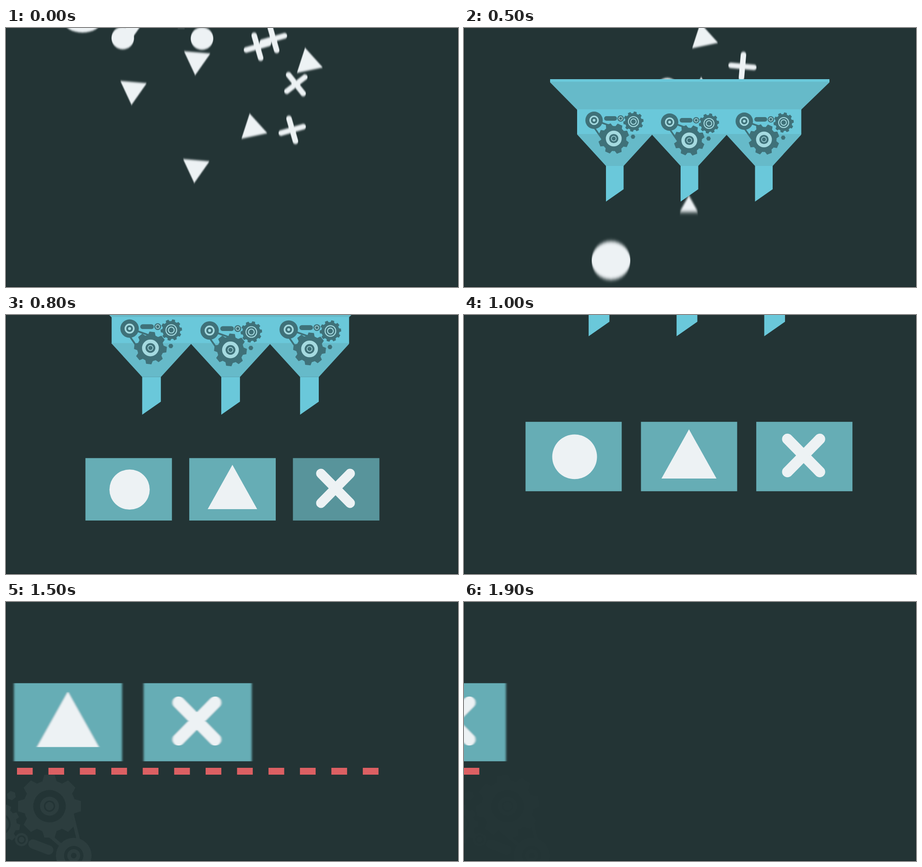
Recreate the animation shown at these times as an HTML page. Size 987 px wide and 567 px high, loop 2 s.

```html
<!DOCTYPE html>
<html lang="en">
<head>
<meta charset="utf-8">
<title>Shape sorter</title>
<style>
  html, body { margin: 0; width: 100%; height: 100%; overflow: hidden; background: #233435; }
  svg { display: block; width: 987px; height: 567px; }
</style>
</head>
<body>
<svg id="stage" viewBox="0 0 987 567" xmlns="http://www.w3.org/2000/svg"></svg>
<script>
const LOOP = 2000, STEP = 100;
const BG = '#233435', WHITE = '#edf2f4', BRIGHT = '#6ac8da', DULL = '#66bac9',
      GEAR = '#3f7179', PALE = '#a5dae0', BOX = '#66adb5', RED = '#dc6063';
const stage = document.getElementById('stage');

// Piecewise linear track of [time, value] pairs.
function track(keys, t) {
  if (t <= keys[0][0]) return keys[0][1];
  for (let i = 1; i < keys.length; i++) {
    const [t0, a] = keys[i - 1], [t1, b] = keys[i];
    if (t <= t1) return a + (b - a) * (t - t0) / (t1 - t0);
  }
  return keys[keys.length - 1][1];
}

const group = (transform, body, extra = '') => `<g transform="${transform}" ${extra}>${body}</g>`;
const circle = (x, y, r, fill) => `<circle cx="${x}" cy="${y}" r="${r}" fill="${fill}"/>`;
const ring = (x, y, r, w, color) =>
  `<circle cx="${x}" cy="${y}" r="${r}" fill="none" stroke="${color}" stroke-width="${w}"/>`;
const rect = (x, y, w, h, fill) => `<rect x="${x}" y="${y}" width="${w}" height="${h}" fill="${fill}"/>`;
const poly = (points, fill) => `<polygon points="${points}" fill="${fill}"/>`;
const stroke = (d, w, color, cap = 'round') =>
  `<path d="${d}" fill="none" stroke="${color}" stroke-width="${w}" stroke-linecap="${cap}"/>`;
const blur = (id, x, y) =>
  `<filter id="${id}" filterUnits="userSpaceOnUse" x="-100" y="-150" width="1300" height="900">
   <feGaussianBlur stdDeviation="${x} ${y}"/></filter>`;

const defs = '<defs>' + blur('fall', 0, 1.9) + blur('drop', 0, 4.2) + blur('slide', 1.7, 0) + '</defs>';

const shapes = {
  C: circle(0, 0, 24.7, WHITE),
  T: poly('0,-33.5 29,16.8 -29,16.8', WHITE),
  P: stroke('M-25 0H25M0-26V26', 12, WHITE),
  B: `<ellipse rx="41" ry="25" fill="${WHITE}"/>`,
  S: rect(-7, -1, 15, 1.5, '#8b9596')
};

// kind, time, x, y, turn, vy, vx
const pieces = [
  ['B', 0, 167, -15, 0, -.6], ['S', 0, 382, 0, 0, -.3],
  ['T', 200, 277, 125, 185],
  ['C', 0, 255, 22, 0, .7, .3],
  ['C', 0, 428, 23, 0, .685],
  ['T', 0, 416, 70, 185, .98, -.01],
  ['T', 0, 277, 135, 185, .635, .035],
  ['T', 0, 414, 306, 185],
  ['T', 0, 660, 76, -12, .655],
  ['T', 0, 539, 220, -12],
  ['P', 0, 549, 41, -16, .69],
  ['P', 0, 584, 24, -16, .605, -.265],
  ['P', 0, 633, 123, -38, .655],
  ['P', 0, 625, 223, -16],
  ['C', 200, 331, 38, 0],
  ['C', 200, 428, 15, 0],
  ['T', 200, 525, 41, -85],
  ['C', 200, 688, 34, 0],
  ['P', 200, 633, 114, -38, .8],
  ['T', 500, 523, 22, -12],
  ['P', 500, 608, 84, 5],
  ['C', 500, 444, 134, 0],
  ['T', 500, 518, 141, 0],
  ['C', 700, 547, 27, 0],
  ['C', 700, 565, -15, 0]
];

function rain(t, top) {
  let out = '';
  for (const [kind, t0, x, y, turn, vy = .67, vx = 0] of pieces) {
    const py = y + vy * (t - t0);
    if (py > -60 && py < top + 35)
      out += group(`translate(${x + vx * (t - t0)} ${py}) rotate(${turn})`, shapes[kind]);
  }
  return `<g filter="url(#fall)">${out}</g>`;
}

function cog(x, y, teeth, r, depth, turn, color) {
  let out = circle(x, y, r - depth, color);
  const w = r * Math.PI / teeth;
  for (let i = 0; i < teeth; i++)
    out += group(`translate(${x} ${y}) rotate(${turn + i * 360 / teeth})`,
      poly(`${-w * .6},${-r + depth + 2} ${-w * .42},${-r} ${w * .42},${-r} ${w * .6},${-r + depth + 2}`, color));
  return out;
}

function machine(t, dark, light) {
  const turn = 24 + (t - 1500) * .09;
  return stroke('M-36-38L-2-26M-44-26L-26 0', 3.6, dark, 'butt')
    + circle(-43, -40, 19, dark) + ring(-43, -40, 8.6, 3.4, light) + circle(-43, -40, 3, light)
    + stroke('M-16-44H2', 10, dark)
    + circle(15, -44, 7, dark) + ring(15, -44, 3.8, 1.6, light)
    + cog(43, -37, 10, 22, 3.5, -turn * 1.25, dark)
    + ring(43, -37, 11, 2, light) + ring(43, -37, 6, 2, light)
    + poly('47,-4 44.5,.4 39.5,.4 37,-4 39.5,-8.4 44.5,-8.4', dark)
    + cog(0, 0, 8, 33.5, 6, turn, dark)
    + ring(0, 0, 13.7, 7.2, light) + ring(0, 0, 5.2, 1.5, light);
}

function funnel(t, top) {
  let out = poly('188,0 798,0 798,7 736,67 247,67 188,7', DULL)
    + rect(188, 0, 610, 6, BRIGHT) + rect(247, 66, 489.5, 55, BRIGHT);
  const lifts = [0, 4, 2];
  [0, 163, 325.5].forEach((x, i) => {
    out += group(`translate(${x} 0)`,
      poly('247,120 410.5,120 410.5,122 348.5,190 310,190 247,121', DULL)
      + poly('310,190 348.5,190 348.5,241 310,268', BRIGHT));
    out += group(`translate(${327 + [0, 165, 328][i]} ${130 + lifts[i]})`, machine(t, GEAR, PALE));
  });
  return group(`translate(0 ${top})`, out);
}

const tokens = [
  circle(0, 0, 41.5, WHITE),
  poly('0,-51 51,40.5 -51,40.5', WHITE),
  stroke('M-30-30L30 31M30-30L-30 31', 20, WHITE)
];

// Each token leaves its spout, then lands in its card.
const cards = [
  { x: 193, cx: 284, cy: 418, land: 600, from: [327, 345], air: [321, 427] },
  { x: 407, cx: 496, cy: 418, land: 700, from: [491, 305], air: [485, 405] },
  { x: 620.7, cx: 708.5, cy: 415, land: 800, from: [654, 265], air: [646, 385] }
];

function sorted(t) {
  const lift = track([[400, 127], [500, 82], [700, 0]], t);
  let out = '';
  cards.forEach((c, i) => {
    const at = t - c.land;
    if (at < -200) return;
    const x = track([[-200, c.from[0]], [-100, c.air[0]], [0, c.cx]], at);
    const y = track([[-200, c.from[1]], [-100, c.air[1]], [0, c.cy]], at);
    const size = track([[-200, .4], [-100, 1.02], [0, 1]], at);
    if (at >= 0)
      out += `<g opacity="${track([[0, .8], [100, 1]], at)}">${rect(c.x, 353, 178.3, 129, BOX)}</g>`;
    const token = group(`translate(${x} ${y}) scale(${size})`, tokens[i]);
    out += at < 0 ? `<g filter="url(#drop)">${token}</g>` : token;
  });
  return group(`translate(0 ${lift})`, out, t >= 1300 ? 'filter="url(#slide)"' : '');
}

function belt(t) {
  const left = track([[1000, 1000], [1500, 24], [1800, -550], [1900, -756]], t);
  let out = '';
  for (let i = 0; i < 12; i++) out += rect(left + i * 68.65, 363, 34.3, 15, RED);
  return out;
}

function draw(t) {
  const top = track([[0, 590], [100, 380], [200, 262], [300, 209], [400, 159],
                     [500, 112], [700, 30], [1000, -74], [1200, -144]], t);
  const zoom = track([[700, 1], [1000, 1.178], [1250, 1.325]], t);
  const panX = track([[700, 0], [1000, -93], [1200, -170], [1300, -300], [1500, -522], [1900, -967]], t);
  const panY = track([[700, 0], [1000, -182], [1250, -290]], t);
  const glow = track([[1000, 0], [1300, 1], [1500, 1], [1900, .2]], t);

  let out = defs + rect(0, 0, 987, 567, BG) + stroke('M.5 0V566.5H986.5V0', 1, '#142425', 'butt');
  if (glow > 0)
    out += group('translate(95 447) rotate(201) scale(2.05)', machine(t, '#2c3d3e', BG), `opacity="${glow}"`);
  if (t > 1000) out += belt(t);
  const world = (t < 1100 ? rain(t, top) : '') + sorted(t) + (t < 1200 ? funnel(t, top) : '');
  stage.innerHTML = out + group(`translate(${panX} ${panY}) scale(${zoom})`, world);
}

const start = performance.now();
let shown = -1;
function tick() {
  const t = Math.floor((performance.now() - start) % LOOP / STEP) * STEP;
  if (t !== shown) draw(shown = t);
  requestAnimationFrame(tick);
}
tick();
</script>
</body>
</html>
```
